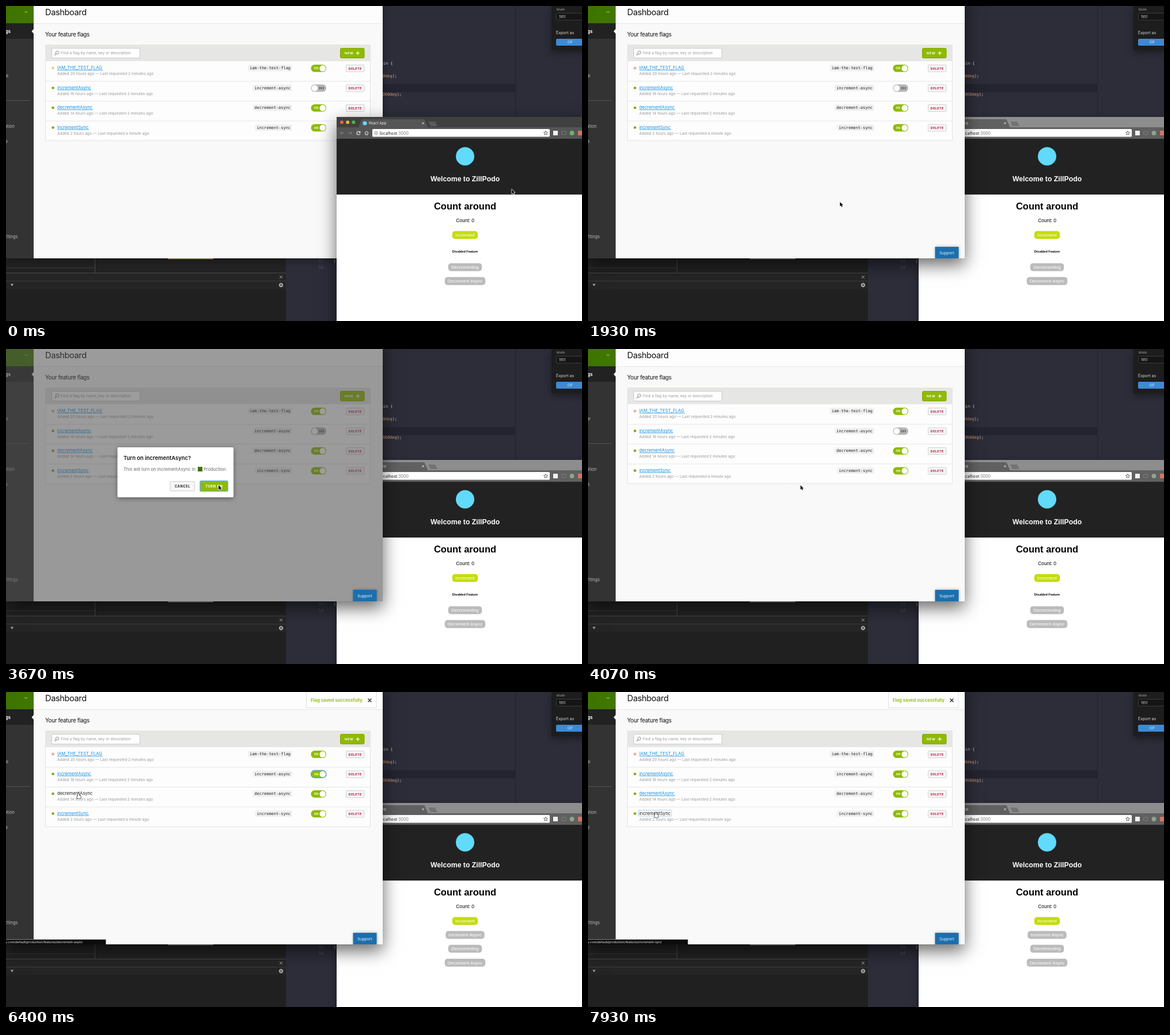
Write an HTML page with a canvas that moves like this. It is 1000 px wide and 548 px high and loops after 8000 ms.

```html
<!DOCTYPE html>
<html lang="en">
<head>
<meta charset="utf-8">
<title>Feature flags</title>
<style>
html, body { margin: 0; width: 100%; height: 100%; overflow: hidden; background: #222; }
canvas { display: block; width: 100%; height: 100%; }
</style>
</head>
<body>
<canvas id="stage"></canvas>
<script>
const LOOP = 8000, W = 1000, H = 548;
const UI = 'Inter, sans-serif';
const ARIAL = '"Liberation Sans", Arial, sans-serif';
const MONO = '"DejaVu Sans Mono", monospace';
const GREEN = '#8fba00';

// Moments, in ms
const SWAP = 1800, OPEN = 2800, CLOSE = 3780, SAVED = 4080, REACT = 4180, LINK = 5740, FOCUS = 7700;

const canvas = document.getElementById('stage');
const c = canvas.getContext('2d');
const clamp = v => Math.max(0, Math.min(1, v));
const ramp = (t, from, len) => clamp((t - from) / len);
const ease = p => p * p * (3 - 2 * p);

const path = [
  [0, 878, 319], [400, 858, 385], [820, 812, 422], [1150, 800, 482], [1350, 795, 470],
  [1780, 480, 352], [1930, 437.5, 341], [2150, 441, 330], [2600, 546, 142], [2870, 548, 140],
  [3020, 548, 140], [3500, 372, 238], [3670, 369, 237], [4060, 369, 237], [4650, 256, 152],
  [5070, 233, 132], [5720, 150, 170], [6100, 128, 176], [6400, 126, 176], [6900, 127, 177],
  [7300, 126, 205], [7930, 118, 209], [8000, 118, 209]
];

const flags = [
  ['IAM_THE_TEST_FLAG', '20 hours', '2 minutes', 'iam-the-test-flag', 168],
  ['incrementAsync', '18 hours', '2 minutes', 'increment-async', 148],
  ['decrementAsync', '14 hours', '2 minutes', 'decrement-async', 151],
  ['incrementSync', '2 hours', 'a minute', 'increment-sync', 144]
];
const rowY = i => 108 + i * 34.5;

function pointer(t) {
  let i = 1;
  while (i < path.length - 1 && path[i][0] < t) i++;
  const a = path[i - 1], b = path[i], p = ease(clamp((t - a[0]) / (b[0] - a[0])));
  return { x: a[1] + (b[1] - a[1]) * p, y: a[2] + (b[2] - a[2]) * p };
}

function rect(x, y, w, h, fill) {
  c.fillStyle = fill;
  c.fillRect(x, y, w, h);
}

function box(x, y, w, h, r, fill, stroke, lw = 1) {
  c.beginPath();
  c.roundRect(x, y, w, h, r);
  if (fill) { c.fillStyle = fill; c.fill(); }
  if (stroke) { c.strokeStyle = stroke; c.lineWidth = lw; c.stroke(); }
}

function dot(x, y, r, fill) {
  c.beginPath();
  c.arc(x, y, r, 0, 7);
  c.fillStyle = fill;
  c.fill();
}

function line(color, lw, ...pts) {
  c.beginPath();
  for (let i = 0; i < pts.length; i += 2) c.lineTo(pts[i], pts[i + 1]);
  c.strokeStyle = color;
  c.lineWidth = lw;
  c.stroke();
}

function poly(fill, ...pts) {
  c.beginPath();
  for (let i = 0; i < pts.length; i += 2) c.lineTo(pts[i], pts[i + 1]);
  c.closePath();
  c.fillStyle = fill;
  c.fill();
}

// y is the middle of the capitals
function text(s, x, y, size, color, { font = UI, weight = 400, align = 'left', gap = 0 } = {}) {
  c.font = `${weight} ${size}px ${font}`;
  c.textAlign = align;
  c.letterSpacing = gap + 'px';
  c.fillStyle = color;
  c.fillText(s, x, y + size * 0.36);
}

function shadow(x, y, w, h, front) {
  c.save();
  c.shadowColor = front ? 'rgba(0,0,0,.6)' : 'rgba(0,0,0,.4)';
  c.shadowBlur = (front ? 28 : 12) * canvas.width / W;
  c.shadowOffsetY = (front ? 11 : 4) * canvas.width / W;
  rect(x, y, w, h, '#222');
  c.restore();
}

function cross(x, y, r, color, lw) {
  line(color, lw, x - r, y - r, x + r, y + r);
  line(color, lw, x + r, y - r, x - r, y + r);
}

function drawDesk(front) {
  rect(0, 0, W, H, '#2c2d39');
  rect(654, 136, 230, 14, '#232430');
  rect(884, 0, 1, 193, '#21222b');
  const code = { font: MONO, align: 'right' };
  text('spin {', 671.5, 99, 6.95, '#d4d4d4', code);
  [['0', 121], ['360', 153]].forEach(([n, y]) => {
    const end = n === '0' ? 679 : 687;
    text(');', end, y, 6.95, '#d4d4d4', code);
    text(n + 'deg', end - 8.4, y, 6.95, '#dd9a68', code);
    text('(', end - 8.4 - (n.length + 3) * 4.18, y, 6.95, '#d4d4d4', code);
  });
  text('53', 551, 444, 6.9, '#50525f', code);
  text('54', 551, 455, 6.9, '#50525f', code);
  text('}', 573, 444, 6.9, '#c9c9c9', code);

  // Developer tools
  rect(0, 439, 486, 109, '#222');
  rect(0, 455, 155, 1, '#383838');
  rect(154, 439, 1, 25, '#4a4a4a');
  rect(0, 464, 486, 1, '#484848');
  rect(0, 465, 486, 27, '#252525');
  rect(0, 478, 486, 1, '#3d3d3d');
  rect(0, 492, 486, 56, '#202020');
  rect(281, 439, 79, 1.5, front ? '#aaa' : '#bfa860');
  cross(477.5, 471.5, 2.3, '#bbb', 1);
  poly('#aaa', 8, 483.5, 13, 483.5, 10.5, 487.5);
  for (let i = 0; i < 4; i++) {
    const a = i * Math.PI / 4, dx = 4 * Math.cos(a), dy = 4 * Math.sin(a);
    line('#bbb', 1.3, 477.5 - dx, 485.5 - dy, 477.5 + dx, 485.5 + dy);
  }
  dot(477.5, 485.5, 2.9, '#bbb');
  dot(477.5, 485.5, 1.4, '#252525');

  // Export panel
  shadow(947, 0, 60, 77, false);
  rect(947, 0, 53, 77, '#1d1d1d');
  text('Width', 955.5, 6.5, 5.4, '#a5a5a5');
  box(955.5, 12.5, 60, 12, 1, '#151515', '#3c3c3c');
  text('1951', 960, 18.5, 5.6, '#e0e0e0');
  text('Export as', 955, 46, 7, '#ddd');
  box(955, 57, 60, 12, 2, '#3c8ad6');
  text('GIF', 979.5, 63, 5.8, '#d4e9ff', { align: 'center' });
}

function drawToggle(y, on, ring) {
  box(529.5, y - 6, 26.5, 12.8, 6.4, on ? GREEN : '#b4b4b4', ring ? '#57a5d8' : null, 1.4);
  dot(on ? 549.7 : 535.9, y + 0.4, 5.3, '#fff');
  if (on) text('ON', 534.7, y + 0.4, 4.6, '#fff', { weight: 700, gap: 0.3 });
  else text('OFF', 543, y + 0.4, 4.6, '#444', { weight: 700, gap: 0.3 });
}

function drawSidebar() {
  rect(0, 0, 48, 439, '#333');
  const g = c.createLinearGradient(0, 0, 48, 0);
  g.addColorStop(0, '#3d7300');
  g.addColorStop(1, '#417800');
  rect(0, 0, 48, 30, g);
  line('#cfe0b8', 1, 32.5, 9.3, 34.8, 11.6, 37.1, 9.3);
  rect(0, 30, 48, 27, '#222');
  poly('#f9f9f9', 48, 40, 44.5, 44, 48, 48);
  rect(0, 164, 41, 1, '#555');
  [['gs', 8, 44, '#fff', 700], ['e', 4, 121], ['ation', 15, 209.5], ['s', 3, 235.5], ['ttings', 20.5, 401.5]]
    .forEach(([s, x, y, color = '#b8b8b8', weight = 400]) =>
      text(s, x, y, 7.5, color, { align: 'right', weight }));
}

function drawDashboard(t, hover, front) {
  shadow(0, -20, 654, 459, front);
  c.save();
  c.beginPath();
  c.rect(0, 0, 654, 439);
  c.clip();
  rect(48, 0, 606, 439, '#f9f9f9');
  rect(48, 0, 606, 30, '#fdfdfd');
  rect(48, 30, 606, 1, '#e6e6e6');
  drawSidebar();
  text('Dashboard', 68, 11, 14.6, '#111', { gap: -0.4 });
  text('Your feature flags', 68, 49, 9.8, '#111', { gap: -0.3 });

  box(68.5, 67.5, 564, 166.5, 0, '#fdfdfd', '#e2e2e2');
  rect(68, 67, 565, 29, '#e6e6e5');
  box(79.5, 73.5, 153, 17, 1.5, '#fff', '#cacaca');
  c.beginPath();
  c.arc(89, 81, 2.7, 0, 7);
  c.strokeStyle = '#888';
  c.lineWidth = 0.9;
  c.stroke();
  line('#888', 1.1, 87, 83, 84.3, 85.8);
  text('Find a flag by name, key or description', 95, 82, 6.65, '#999');
  box(580.5, 73.5, 41.5, 17, 2, GREEN, '#7fa600');
  text('NEW', 588, 82, 5.4, '#fff', { weight: 700, gap: 0.8 });
  line('#fff', 1.2, 607.5, 82, 614, 82);
  line('#fff', 1.2, 610.7, 78.8, 610.7, 85.2);

  flags.forEach(([name, age, seen, key, end], i) => {
    const y = rowY(i), over = hover === i;
    if (i) rect(69, y - 12, 563, 1, '#e6e6e6');
    dot(81.5, y, 2.3, i ? '#7cab12' : t < SWAP ? '#e5c56a' : '#ea937c');
    if (!i) dot(81.5, y, 1.1, t < SWAP ? '#f3e3b4' : '#f8d3c8');
    text(name, 89, y - 0.5, 7.67, over ? '#222' : '#1791e0');
    if (!over) rect(89, y + 3.1, end - 89, 0.8, '#1791e0');
    if (i === 3 && t >= FOCUS) box(87.5, y - 6, 57.5, 10.5, 1, null, '#b4d2ee');
    text(`Added ${age} ago — Last requested ${seen} ago`, 89, y + 10, 6.65, '#999');
    const w = key.length * 4.18;
    box(491 - w, y - 5.5, w + 5.5, 11, 1.5, '#f0f0f0');
    text(key, 494, y, 6.94, '#222', { font: MONO, align: 'right' });
    drawToggle(y, i !== 1 || t >= SAVED, i === 1 && t >= SAVED && t < FOCUS);
    box(590.5, y - 5.5, 31.5, 12, 1.5, '#f6f6f6', '#d2d2d2');
    text('DELETE', 594.8, y + 0.7, 5.3, '#b80f3c', { weight: 700, gap: 0.5 });
  });

  const drop = ease(ramp(t, SAVED, 180));
  if (drop > 0) {
    c.save();
    c.translate(0, (drop - 1) * 30);
    box(521.5, -5, 121.5, 32.5, 1, '#fdfdfd', '#dedede');
    text('Flag saved successfully', 529, 14.5, 7.75, GREEN, { weight: 600 });
    cross(631.5, 14.5, 3, '#333', 1.5);
    c.restore();
  }

  const dim = ramp(t, OPEN - 60, 120) * (1 - ramp(t, CLOSE, 130));
  if (dim > 0) {
    c.globalAlpha = dim;
    rect(0, 0, 654, 439, 'rgba(75,75,75,.55)');
    c.globalAlpha = 1;
    drawDialog(ramp(t, OPEN, 200), 1 - ramp(t, CLOSE, 100));
  }

  c.save();
  c.shadowColor = 'rgba(0,0,0,.35)';
  c.shadowBlur = 5;
  rect(602.5, 419, 41, 20, '#1b6fad');
  c.restore();
  text('Support', 623, 429.3, 6.75, '#fff', { font: '"Open Sans", sans-serif', align: 'center' });

  const bar = ramp(t, LINK, 150);
  if (bar > 0) {
    c.globalAlpha = bar;
    box(-3, 430.5, 176.5, 10, 1, '#0c0c0c', '#aaa', 0.7);
    text('y.com/default/production/features/' + flags[hover === 3 || t > 7150 ? 3 : 2][3], -1, 435, 5.4, '#eee');
    c.globalAlpha = 1;
  }
  c.restore();
}

function drawDialog(grow, alpha) {
  if (grow <= 0 || alpha <= 0) return;
  const s = 0.86 + 0.14 * grow;
  c.save();
  c.globalAlpha = alpha * clamp(grow * 4);
  c.translate(294.3, 214.4);
  c.scale(s, s);
  c.translate(-294.3, -214.4);
  c.save();
  c.shadowColor = 'rgba(0,0,0,.4)';
  c.shadowBlur = 8;
  c.shadowOffsetY = 2;
  box(193.5, 171, 201.5, 87, 2, '#fff');
  c.restore();
  text('Turn on incrementAsync?', 204, 189.5, 9.45, '#111', { weight: 600 });
  text('This will turn on incrementAsync in', 204, 209, 7.55, '#666');
  rect(333, 205, 8, 8, '#3f7300');
  text('Production.', 343, 209, 7.5, '#666');
  box(285, 230.5, 42.5, 16.5, 1.5, '#f7f7f7', '#ccc');
  text('CANCEL', 306.5, 238.8, 5.7, '#222', { weight: 700, gap: 0.6, align: 'center' });
  box(337, 229.5, 48, 18, 2, GREEN, '#63b0e4', 1.6);
  text('TURN ON', 361.3, 238.8, 5.7, '#fff', { weight: 700, gap: 0.6, align: 'center' });
  c.restore();
}

function drawApp(t, front) {
  shadow(574, 193, 440, 380, front);
  const bar = front ? '#555' : '#606060';
  rect(574, 193, 426, 19, front ? '#404040' : '#8d8d8d');
  poly(bar, 612, 212, 617, 198, 619, 197, 725, 197, 727, 198, 733, 212);
  poly(front ? '#5a5a5a' : '#737373', 733, 201, 745, 201, 749, 209, 737, 209);
  ['#f25a52', '#e5b935', '#4cb944'].forEach((k, i) => dot(583 + i * 10.2, 202.2, 3, k));
  dot(623, 204, 3.6, '#61dafb');
  text('React App', 630, 204, 6.2, '#f0f0f0');
  cross(724, 204, 1.8, '#ddd', 0.9);

  rect(574, 211, 426, 20, bar);
  line('#858585', 1, 586.5, 221, 580.5, 221);
  line('#858585', 1, 583, 218.3, 580.2, 221, 583, 223.7);
  line('#858585', 1, 594, 221, 600, 221);
  line('#858585', 1, 597.5, 218.3, 600.3, 221, 597.5, 223.7);
  c.beginPath();
  c.arc(612, 221, 2.9, 0.4, 5.6);
  c.strokeStyle = '#eee';
  c.lineWidth = 1.1;
  c.stroke();
  poly('#eee', 615.3, 217.5, 615.3, 221, 612, 220.4);
  line('#eee', 1, 622.5, 221, 626, 217.8, 629.5, 221);
  line('#eee', 1, 624, 220.5, 624, 224, 628, 224, 628, 220.5);
  box(636, 214, 308, 13.5, 1.5, '#fff');
  c.beginPath();
  c.arc(642.5, 221, 2.7, 0, 7);
  c.strokeStyle = '#666';
  c.lineWidth = 0.7;
  c.stroke();
  rect(642.1, 220.5, 0.8, 2.2, '#666');
  rect(642.1, 219, 0.8, 0.8, '#666');
  text('localhost', 648.5, 221, 7.15, '#222');
  const host = c.measureText('localhost').width;
  text(':3000', 648.5 + host, 221, 7.15, '#777');
  c.beginPath();
  for (let i = 0; i < 10; i++) {
    const a = i * Math.PI / 5 - Math.PI / 2, r = i % 2 ? 1.7 : 3.7;
    c.lineTo(937 + r * Math.cos(a), 221 + r * Math.sin(a));
  }
  c.closePath();
  c.strokeStyle = '#444';
  c.lineWidth = 0.8;
  c.stroke();
  rect(950, 217, 8, 8, '#f2f2f2');
  box(964.5, 218, 7.5, 5.5, 0.5, null, '#858585', 0.8);
  dot(982.5, 221, 3.9, front ? '#6db36b' : '#90a38f');
  rect(993, 217, 7, 8, '#d9745e');

  rect(574, 231, 426, 97, '#222');
  rect(574, 328, 426, 220, '#fff');
  dot(797, 261.5, 16, '#61dafb');
  const mid = { font: ARIAL, align: 'center' }, bold = { ...mid, weight: 700 };
  text('Welcome to ZillPodo', 797, 301, 12.25, '#fff', bold);
  text('Count around', 797, 348.5, 16.5, '#000', bold);
  text('Count: 0', 797, 373.3, 8.4, '#000', mid);
  const live = t >= REACT;
  const button = (s, y, w, fill) => {
    box(797 - w / 2, y - 6.9, w, 13.8, 5, fill);
    text(s, 797, y, 7.65, '#fff', mid);
  };
  button('Increment', 398.4, 44.5, '#c4dc0c');
  if (live) button('Increment Async', 422.6, 67.5, '#bbb');
  else text('Disabled Feature', 797, 426.6, 5.5, '#000', bold);
  const shift = live ? 0 : 7.6;
  button('Decrementing', 446.7 + shift, 58.5, '#bbb');
  button('Decrement Async', 470.9 + shift, 70.5, '#bbb');
}

function drawPointer(x, y, hand) {
  c.save();
  c.translate(x, y);
  c.lineJoin = 'round';
  c.beginPath();
  if (hand) {
    c.roundRect(-1, 0, 2, 6, 1);
    c.roundRect(-2.6, 4, 6.4, 5.4, 2);
    c.fillStyle = '#fff';
    c.strokeStyle = '#222';
    c.lineWidth = 1.4;
    c.stroke();
    c.fill();
  } else {
    [[0, 0], [0, 7.6], [1.8, 6], [3, 8.8], [4.3, 8.2], [3.1, 5.5], [5.5, 5.5]]
      .forEach(p => c.lineTo(...p));
    c.closePath();
    c.strokeStyle = '#fff';
    c.lineWidth = 1.3;
    c.stroke();
    c.fillStyle = '#000';
    c.fill();
  }
  c.restore();
}

function draw(t) {
  const p = pointer(t), front = t >= SWAP;
  const hover = t < LINK ? -1 : flags.findIndex((f, i) => p.x < f[4] && Math.abs(p.y - rowY(i)) < 7);
  drawDesk(front);
  if (front) {
    drawApp(t, false);
    drawDashboard(t, hover, true);
  } else {
    drawDashboard(t, hover, false);
    drawApp(t, true);
  }
  drawPointer(p.x, p.y, hover >= 0);
}

function resize() {
  const k = window.devicePixelRatio || 1;
  canvas.width = W * k;
  canvas.height = H * k;
}

function tick(now) {
  c.setTransform(canvas.width / W, 0, 0, canvas.height / H, 0, 0);
  draw(now % LOOP);
  requestAnimationFrame(tick);
}

addEventListener('resize', resize);
resize();
requestAnimationFrame(tick);
</script>
</body>
</html>
```
